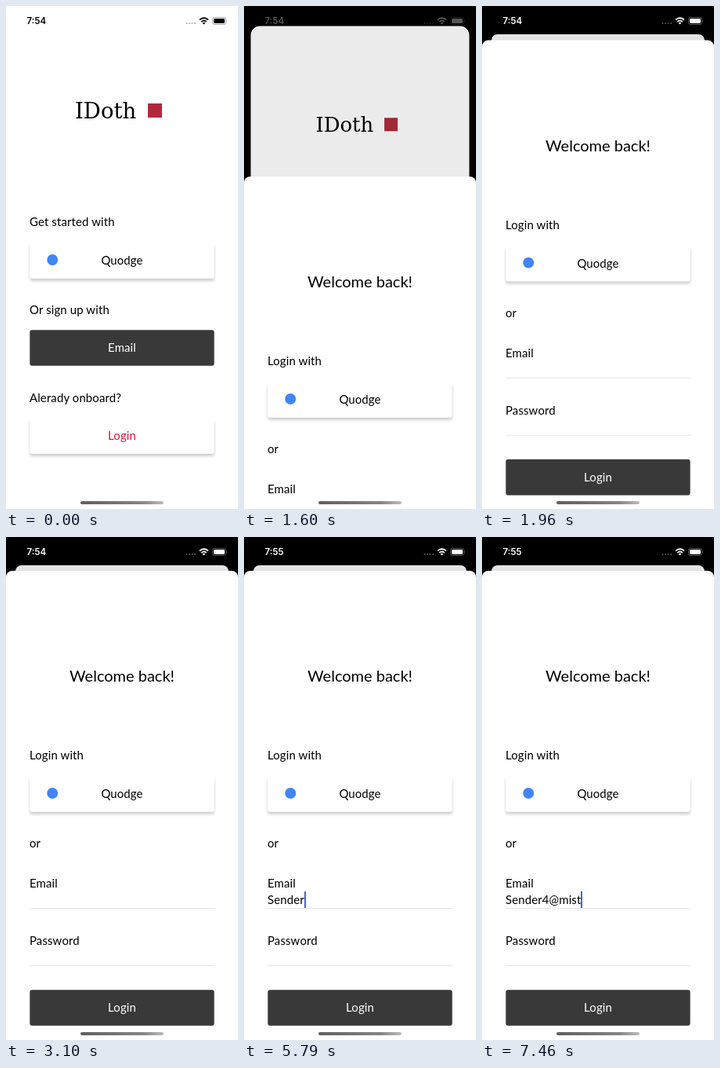
An HTML page that plays this animation: 296 by 640 pixels, repeating every 8000 ms.

```html
<!DOCTYPE html>
<html lang="en">
<head>
<meta charset="utf-8">
<title>Login sheet</title>
<style>
  html, body { margin: 0; width: 100%; height: 100%; overflow: hidden; background: #000; }
  body { font: 15px/20px Lato, sans-serif; letter-spacing: .1px; color: #000; }
  #stage { position: relative; width: 296px; height: 640px; overflow: hidden; }
  #stage * { position: absolute; box-sizing: border-box; white-space: pre; }
  #card, #sheet { left: 0; top: 0; width: 296px; height: 640px; background: #fff; overflow: hidden; }
  #card { transform-origin: 50% 0; }
  #sheet { border-radius: 8px 8px 0 0; }
  .label { left: 30px; }
  /* The slight scale gives the buttons their sub-pixel edges */
  .button { left: 30px; width: 236px; height: 46px; line-height: 44px; text-align: center;
            transform: scale(.997, .99); border-radius: 3px; background: #fff;
            box-shadow: 0 3px 4px rgba(0, 0, 0, .2); }
  .dark { background: #393939; color: #fff; box-shadow: none; }
  .dot { left: 21.5px; top: 14.5px; width: 14px; height: 14px; border-radius: 50%; background: #4285f4; }
  .rule { left: 30px; width: 236px; height: 1px; background: #e4e4e4; }
  .title { left: 0; width: 100%; text-align: center; font-size: 20px; letter-spacing: 0; }
  #brand { left: 88px; top: 113px; font: 27.5px/40px "DejaVu Serif", serif; letter-spacing: 0; }
  #mark { left: 181px; top: 124px; width: 18px; height: 18px; background: #b02a3c; }
  #login { left: 0; width: 100%; color: #d4163c; }
  #field { left: 30px; top: 408px; height: 22px; display: flex; }
  #field * { position: static; }
  #caret { width: 2px; height: 22px; background: #3f66d6; }
  #status { left: 0; top: 0; width: 296px; height: 40px; letter-spacing: 0; }
  #clock { font: 600 11.5px Inter, sans-serif; }
  #home { left: 95px; top: 630px; width: 106px; height: 4px; border-radius: 2px;
          background: linear-gradient(90deg, #5f5f5f, #858585 75%, #bcbcbc); }
</style>
</head>
<body>
<div id="stage">
  <div id="card">
    <div id="brand">IDoth</div><div id="mark"></div>
    <div class="label" style="top:264px">Get started with</div>
    <div class="button" style="top:301px"><i class="dot"></i>Quodge</div>
    <div class="label" style="top:376px">Or sign up with</div>
    <div class="button dark" style="top:412px">Email</div>
    <div class="label" style="top:488px">Alerady onboard?</div>
    <div class="button" style="top:524px"><span id="login">Login</span></div>
  </div>
  <div id="sheet">
    <div class="title" style="top:123px">Welcome back!</div>
    <div class="label" style="top:224px">Login with</div>
    <div class="button" style="top:261px"><i class="dot"></i>Quodge</div>
    <div class="label" style="top:336px">or</div>
    <div class="label" style="top:387px">Email</div>
    <div id="field"><span id="typed"></span><i id="caret"></i></div>
    <div class="rule" style="top:429px"></div>
    <div class="label" style="top:460px">Password</div>
    <div class="rule" style="top:502px"></div>
    <div class="button dark" style="top:533px">Login</div>
  </div>
  <svg id="status" viewBox="0 0 296 40" fill="currentColor">
    <text id="clock" x="26.5" y="23">7:54</text>
    <g opacity=".35">
      <circle cx="230.5" cy="22" r="1"/><circle cx="234" cy="22" r="1"/>
      <circle cx="237.5" cy="22" r="1"/><circle cx="241" cy="22" r="1"/>
    </g>
    <path d="M247 17.6q5.5-4.6 11 0M249.3 20q3.2-2.7 6.4 0" fill="none" stroke="currentColor" stroke-width="1.8"/>
    <path d="M250.6 21.5q1.9-1.4 3.8 0l-1.9 2z"/>
    <rect x="263.5" y="14.5" width="17" height="9" rx="2.6" fill="none" stroke="currentColor" opacity=".35"/>
    <rect x="265" y="16" width="14" height="6" rx="1.4"/>
    <path d="M281.6 17.5q1.6 1.5 0 3z" opacity=".45"/>
  </svg>
  <div id="home"></div>
</div>
<script>
const LOOP = 8000, SHEET_TOP = 43;
const EMAIL = "Sender4@mist";
const $ = id => document.getElementById(id);

// Screen updates: start time, spring phase, status grey, login opacity, home bar opacity
const PRESENT = [
  [0, 0, 0, 1, 1], [1350, 0, 0, .2, 1], [1470, .28, 0, .25, 1],
  [1600, 2.48, 85, 1, 1], [1730, 4.9, 215, 1, .2], [1850, 7.1, 255, 1, 1],
  [1960, 9.2, 255, 1, 1], [3100, 20, 255, 1, 1]
];
// Typing: start time, characters entered
const TYPING = [
  [0, 0], [4090, 1], [4270, 2], [4420, 3], [5110, 5], [5790, 6], [6020, 7],
  [6460, 8], [7140, 10], [7280, 11], [7460, 12]
];
const current = (steps, t) => steps.filter(step => step[0] <= t).pop();
const spring = x => 1 - (1 + x) * Math.exp(-x);

function draw() {
  const t = performance.now() % LOOP;
  const [, phase, grey, loginOpacity, homeOpacity] = current(PRESENT, t);
  const p = spring(phase);

  $("card").style.transform = `translateY(${36 * p}px) scale(${1 - .082 * p})`;
  $("card").style.borderRadius = p ? `${8 + 28 * (1 - p) ** 1.5}px` : 0;
  $("card").style.filter = `brightness(${1 - .11 * p})`;
  $("sheet").style.transform = `translateY(${640 - (640 - SHEET_TOP) * p}px)`;
  $("login").style.opacity = loginOpacity;
  $("home").style.opacity = homeOpacity;
  $("status").style.color = `rgb(${grey}, ${grey}, ${grey})`;
  $("clock").textContent = t < 5790 ? "7:54" : "7:55";
  $("typed").textContent = EMAIL.slice(0, current(TYPING, t)[1]);
  $("caret").style.opacity = t < 3230 || (t >= 3850 && t < 4090) ? 0 : 1;
  requestAnimationFrame(draw);
}
draw();
</script>
</body>
</html>
```
